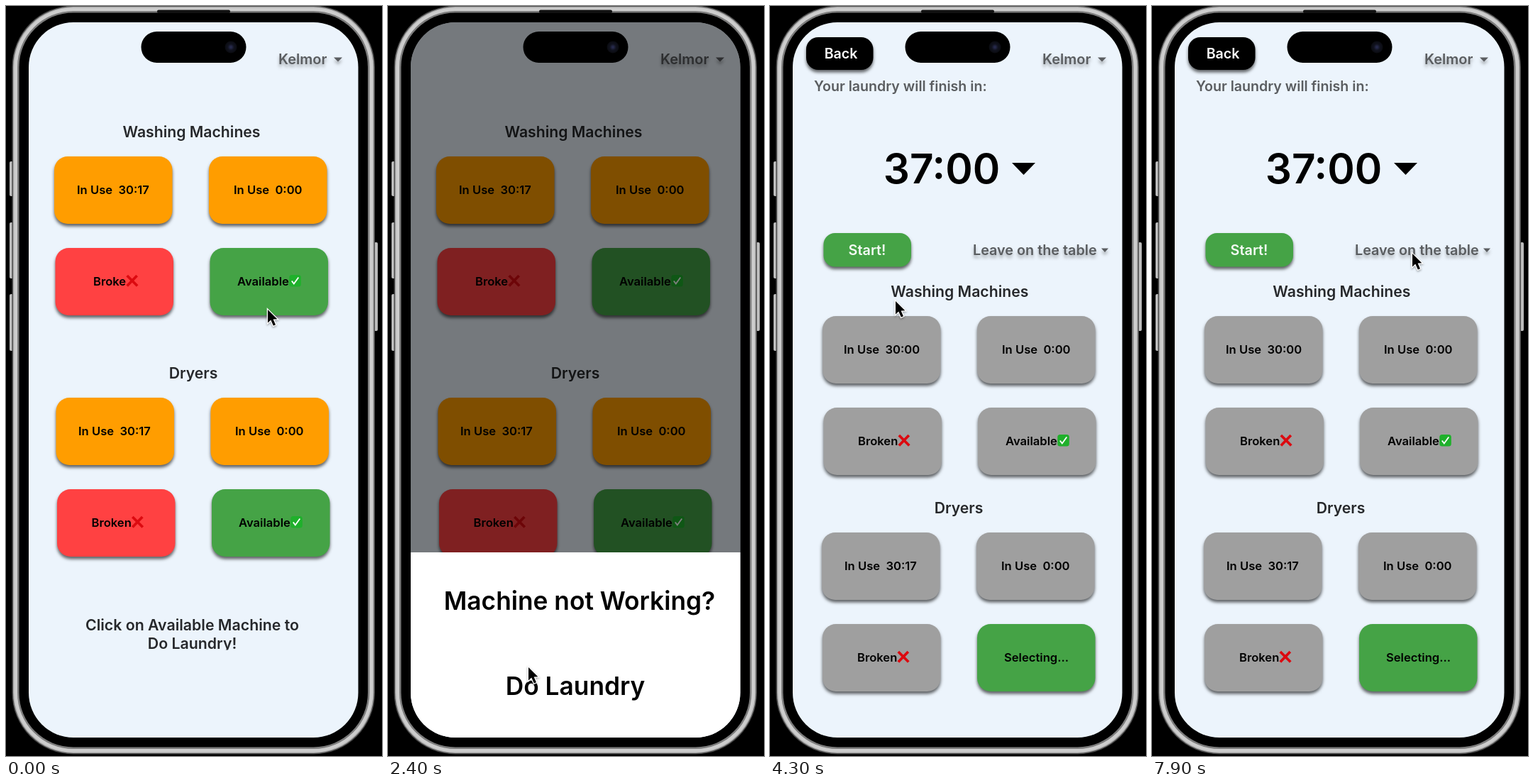
Animation, 530 px wide and 1057 px high, one loop 8 s. Source, as an HTML page with a canvas:

```html
<!DOCTYPE html>
<html lang="en">
<head>
<meta charset="utf-8">
<title>Laundry app</title>
<style>
html, body { margin: 0; width: 100%; height: 100%; overflow: hidden; background: #000; }
canvas { display: block; width: 530px; height: 1057px; }
</style>
</head>
<body>
<canvas id="stage" width="530" height="1057"></canvas>
<script>
const ctx = document.getElementById('stage').getContext('2d');
const LOOP = 8000;
const BG = '#ecf4fc';
const INK = '#26282b';
const SOFT = '#5a5d60';
const ORANGE = [255, 157, 0], RED = [255, 65, 66], GREEN = [69, 163, 70], GREY = [159, 159, 159];

// x, y and colour on the first page, then on the second
const cards = [
  [68, 212, ORANGE, 74, 437, GREY],
  [286, 212, ORANGE, 292, 437, GREY],
  [69.5, 341, RED, 75.5, 566, GREY],
  [287.5, 341, GREEN, 293, 566, GREY],
  [70.5, 552, ORANGE, 73, 742, GREY],
  [288.5, 552, ORANGE, 291, 742, GREY],
  [72, 681, RED, 74, 871, GREY],
  [290, 681, GREEN, 292, 871, GREEN]
];
const moving = [
  ['In Use  30:17', 100, 259, 105, 789],
  ['In Use  0:00', 321, 259, 327, 484],
  ['Available', 326, 388, 332, 613, 'check'],
  ['Broken', 120.5, 728, 124, 613, 'cross'],
  ['In Use  0:00', 323, 599, 326, 789]
];
const leaving = [
  ['Broke', 123, 388, 'cross'],
  ['In Use  30:17', 102, 599],
  ['Available', 328, 728, 'check']
];
const arriving = [
  ['In Use  30:00', 104, 484],
  ['Broken', 123, 918, 'cross'],
  ['Selecting...', 330, 918]
];
// time, x, y
const pointer = [
  [0, 368, 426], [700, 365, 391], [1350, 365, 391], [2300, 197, 930], [2850, 197, 930],
  [4250, 176, 414], [4450, 176, 414], [5300, 242, 245], [6100, 242, 245], [6550, 240, 372],
  [6850, 240, 372], [7600, 366, 347], [8000, 366, 347]
];

const clamp = v => Math.min(1, Math.max(0, v));
const lerp = (a, b, k) => a + (b - a) * k;
const smooth = k => k * k * (3 - 2 * k);
const mix = (a, b, k) => `rgb(${a.map((v, i) => Math.round(lerp(v, b[i], k))).join(',')})`;

// cubic-bezier(0, 0, .58, 1)
function easeOut(x) {
  if (x <= 0 || x >= 1) return clamp(x);
  let lo = 0, hi = 1;
  for (let i = 0; i < 20; i++) {
    const s = (lo + hi) / 2;
    if (1.74 * (1 - s) * s * s + s * s * s < x) lo = s; else hi = s;
  }
  return 3 * lo * lo - 2 * lo * lo * lo;
}

function box(x, y, w, h, r, fill) {
  ctx.beginPath();
  ctx.roundRect(x, y, w, h, r);
  ctx.fillStyle = fill;
  ctx.fill();
}

function shadow(alpha, blur, dy) {
  ctx.shadowColor = `rgba(0,0,0,${alpha})`;
  ctx.shadowBlur = blur;
  ctx.shadowOffsetY = dy;
}

function raised(x, y, w, h, r, fill) {
  ctx.save();
  shadow(0.6, 4, 3.5);
  box(x, y, w, h, r, fill);
  ctx.restore();
}

// y is the middle of the capitals
function text(str, x, y, size, fill = '#000', align = 'left') {
  ctx.font = `600 ${size}px Inter, "Liberation Sans", sans-serif`;
  ctx.textAlign = align;
  ctx.fillStyle = fill;
  ctx.fillText(str, x, y + size * 0.364);
}

function shape(fill, ...pts) {
  ctx.beginPath();
  pts.forEach(([x, y]) => ctx.lineTo(x, y));
  ctx.closePath();
  ctx.fillStyle = fill;
  ctx.fill();
}

function caret(x, y, w, h, fill) {
  shape(fill, [x, y], [x + w, y], [x + w / 2, y + h]);
}

function line(color, width, ...pts) {
  ctx.beginPath();
  pts.forEach(([x, y]) => ctx.lineTo(x, y));
  ctx.strokeStyle = color;
  ctx.lineWidth = width;
  ctx.stroke();
}

function icon(kind, x, y) {
  if (kind === 'check') {
    box(x - 8, y - 8.5, 16.5, 16.5, 3.5, '#1fb02b');
    line('#fff', 1.9, [x - 4.5, y], [x - 1.5, y + 4], [x + 5, y - 5]);
  } else {
    line('#dc0a10', 3.8, [x - 7, y - 7.5], [x + 7.5, y + 7]);
    line('#dc0a10', 3.8, [x + 7, y - 7.5], [x - 7, y + 7]);
  }
}

function label(str, x, y, kind) {
  text(str, x, y, 16.6);
  if (kind) icon(kind, x + ctx.measureText(str).width + 8.5, y - 0.5);
}

function faded(alpha, draw) {
  if (alpha <= 0) return;
  ctx.save();
  ctx.globalAlpha = alpha;
  draw();
  ctx.restore();
}

function hall() {
  ctx.save();
  shadow(0.3, 4, 4);
  text('Kelmor', 384, 75, 20, SOFT);
  caret(462, 72.5, 12, 6, SOFT);
  ctx.restore();
}

function hint() {
  ctx.beginPath();
  ctx.rect(32, 850, 465, 57.5);
  ctx.clip();
  text('Click on Available Machine to', 262.5, 872, 21.3, INK, 'center');
  text('Do Laundry!', 262.5, 898, 21.3, INK, 'center');
}

function controls() {
  raised(51, 44, 94.5, 46, 17, '#000');
  text('Back', 100, 67, 19.6, '#fff', 'center');
  text('Your laundry will finish in:', 62, 113, 19.6, SOFT);
  text('37:00', 242, 229, 58.4, '#000', 'center');
  caret(341, 221, 33, 17, '#000');
  raised(75.5, 320, 123.5, 47.5, 16, `rgb(${GREEN})`);
  text('Start!', 137, 343.5, 19.8, '#f4faf4', 'center');
  ctx.save();
  shadow(0.3, 4, 4);
  text('Leave on the table', 286, 343.5, 19.8, SOFT);
  caret(467, 341.5, 10, 5.5, SOFT);
  ctx.restore();
}

function page(k) {
  for (const [x0, y0, c0, x1, y1, c1] of cards)
    raised(lerp(x0, x1, k), lerp(y0, y1, k), 166.5, 95, 19, mix(c0, c1, k));
  faded(1 - k, () => leaving.forEach(a => label(...a)));
  faded(1 - k, hint);
  faded(k, () => arriving.forEach(a => label(...a)));
  text('Washing Machines', lerp(261.5, 267.3, k), lerp(177.5, 402.5, k), 21.2, INK, 'center');
  text('Dryers', lerp(264, 266, k), lerp(517, 707.5, k), 21.2, INK, 'center');
  for (const [str, x0, y0, x1, y1, kind] of moving)
    label(str, lerp(x0, x1, k), lerp(y0, y1, k), kind);
  hall();
}

function sheet(open, k) {
  const top = lerp(1031, 770, open);
  const dim = Math.min(0.5, open * 0.55) * (1 - k);
  faded(dim, () => box(32, 23, 465, top - 23, 0, '#000'));
  if (open > 0) faded(1 - k, () => {
    box(32, top, 465, 261, 0, '#fff');
    text('Machine not Working?', 270, top + 68.5, 35.3, '#000', 'center');
    text('Do Laundry', 264, top + 188, 35.3, '#000', 'center');
  });
}

function menu() {
  box(85, 262, 316, 308, 0, BG);
  ['35:00', '37:00', '39:00', '60:00'].forEach((s, i) =>
    text(s, 243, 298 + i * 75.7, 58.4, '#000', 'center'));
}

// one layer of the body, this far outside the screen
function shell(gap, fill) {
  box(32 - gap, 23 - gap, 464.5 + 2 * gap, 1008 + 2 * gap, 63 + gap, fill);
}

function phone() {
  const metal = '#bdbdbd';
  for (const [y, h] of [[219, 49], [305, 79], [406, 80]]) box(5, y, 5, h, 2, metal);
  box(519, 333, 5, 125, 2, metal);
  shell(23.5, '#4c4c4c');
  shell(22, '#b0b0b0');
  shell(20.5, '#cdcdcd');
  shell(16, '#7c7c7c');
  shell(13.5, '#000');
  box(213, 5.5, 103, 4.5, 2, '#111');
}

function island() {
  box(190.5, 36, 148, 44, 22, '#000');
  const g = ctx.createRadialGradient(317, 58, 1, 317, 58, 8.5);
  g.addColorStop(0, '#272a4c');
  g.addColorStop(0.45, '#11131f');
  g.addColorStop(1, '#0a0b10');
  box(308.5, 49.5, 17, 17, 8.5, g);
}

function cursor(t) {
  const i = pointer.findIndex(p => p[0] > t);
  const [ta, xa, ya] = pointer[i - 1], [tb, xb, yb] = pointer[i];
  const k = smooth((t - ta) / (tb - ta));
  ctx.save();
  ctx.translate(lerp(xa, xb, k), lerp(ya, yb, k));
  const pts = [[1, 2], [1, 20.5], [5.3, 16.6], [8.8, 24.6], [12, 23.2], [8.6, 15.4], [14.3, 15.2]];
  shadow(0.35, 3, 1.5);
  line('#fff', 2.6, ...pts, pts[0], pts[1]);
  shadow(0, 0, 0);
  shape('#000', ...pts);
  ctx.restore();
}

function draw(now) {
  const t = now % LOOP;
  const open = easeOut((t - 975) / 305);
  const k = easeOut((t - 2516) / 300);
  ctx.fillStyle = '#000';
  ctx.fillRect(0, 0, 530, 1057);
  phone();
  ctx.save();
  box(32, 23, 464.5, 1008, 63, BG);
  ctx.clip();
  page(k);
  sheet(open, k);
  faded(k, controls);
  if (t >= 5600 && t < 6800) menu();
  ctx.restore();
  island();
  cursor(t);
}

const start = performance.now();
function tick() {
  draw(performance.now() - start);
  requestAnimationFrame(tick);
}
tick();
</script>
</body>
</html>
```
